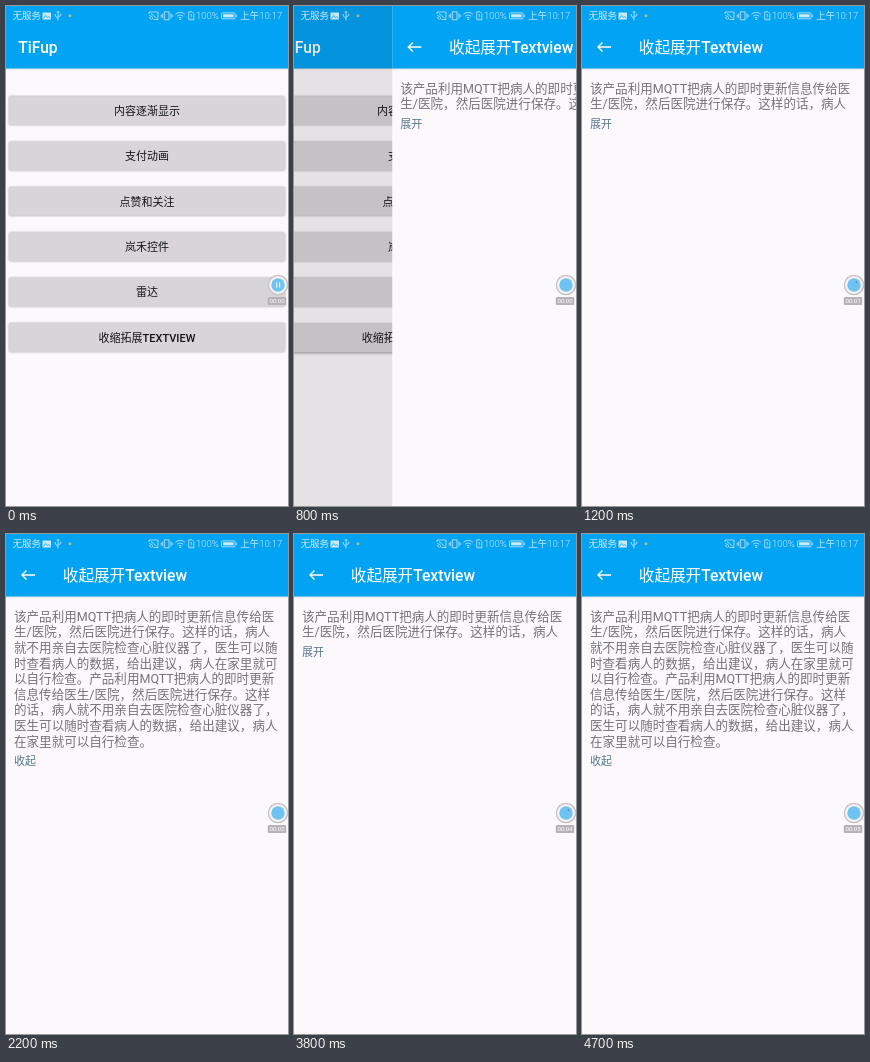
Animation of 282 by 500 pixels, one loop 4800 ms. Source, as an HTML page:

```html
<!DOCTYPE html>
<html lang="zh-CN">
<head>
<meta charset="utf-8">
<title>Expandable text demo</title>
<style>
  html, body { margin: 0; width: 100%; height: 100%; overflow: hidden; background: #fcf8fc; }
  svg { display: block; width: 100vw; height: 100vh; }
  text { font-family: Roboto, "Noto Sans CJK SC", "Noto Sans CJK", sans-serif; }
  .title { font-size: 15.6px; font-weight: 500; fill: #fff; }
  .btn text { font-size: 11px; font-weight: 500; fill: #151515; text-anchor: middle; }
  .btn rect { fill: #d8d4d8; filter: drop-shadow(0 .8px .8px rgba(0, 0, 0, .32)); }
  .btn.pressed rect { filter: drop-shadow(0 1.6px 1.5px rgba(0, 0, 0, .4)); }
  .body text { font-size: 12.55px; fill: #757378; }
  #toggle { font-size: 11px; fill: #527789; }
  .status text { font-size: 9.5px; font-weight: 300; fill: #fff; }
  .status { opacity: .78; fill: none; stroke: #fff; stroke-width: .8; }
  .status text, .status .solid { stroke: none; fill: #fff; }
  #clock { font-size: 6.1px; fill: #fff; text-anchor: middle; }
</style>
</head>
<body>
<svg viewBox="0 0 282 500">
  <defs>
    <clipPath id="fold"><rect id="foldBox" x="0" y="70" width="282" height="36"/></clipPath>
    <linearGradient id="drop" x2="0" y2="1">
      <stop offset="0" stop-color="#000" stop-opacity=".14"/>
      <stop offset="1" stop-color="#000" stop-opacity="0"/>
    </linearGradient>
  </defs>

  <g id="home">
    <rect width="330" height="500" fill="#fcf8fc"/>
    <rect width="330" height="62.5" fill="#03a3f3"/>
    <rect y="62.5" width="330" height="1.5" fill="url(#drop)"/>
    <text class="title" x="12.3" y="46.5">TiFup</text>
    <g id="list"></g>
  </g>
  <rect id="dim" width="282" height="500" opacity="0"/>

  <g id="detail">
    <rect width="282" height="500" fill="#fcf8fc"/>
    <rect width="282" height="62.5" fill="#03a3f3"/>
    <rect y="62.5" width="282" height="1.5" fill="url(#drop)"/>
    <path d="M29 41H16M20.5 36.5L16 41L20.5 45.5" fill="none" stroke="#fff" stroke-width="1.4"/>
    <text class="title" x="56.8" y="46.5">收起展开Textview</text>
    <g class="body" id="lines" clip-path="url(#fold)"></g>
    <text id="toggle" x="8" y="121.6">展开</text>
  </g>

  <g class="status">
    <text x="6.6" y="13.3">无服务</text>
    <rect class="solid" x="36.5" y="6.5" width="8.5" height="7" rx=".6"/>
    <path d="M37.5 12.5l2.3-3 1.8 2 1-1 1.8 2" stroke="#03a3f3"/>
    <path d="M52 5.5V14.5M49.3 8v2.2l2.7 1.8M54.7 7.5v2l-2.7 1.5M51 6.7l1-1.5 1 1.5"/>
    <circle cx="64" cy="9.8" r="1.5" stroke="none" fill="#c8c37a"/>
    <path d="M143 8V6h9v7.5h-4M143 9.5a4 4 0 0 1 4 4M143 11.5a2 2 0 0 1 2 2M145 7.5l5.5 4.5"/>
    <path d="M158.5 5.8h4.5v8h-4.5zM156.6 7.5v4.8M164.9 7.5v4.8M155.2 8.6v2.6M166.3 8.6v2.6"/>
    <path d="M169.5 8.3q4.7-4 9.4 0M171.2 10.2q3-2.6 6 0M172.8 12q1.4-1.2 2.8 0"/>
    <circle class="solid" cx="174.2" cy="13.2" r=".8"/>
    <path d="M182.7 5.8h3.4l1.8 1.8v6.2h-5.2zM185.3 8v2.8M185.3 11.7v.9"/>
    <text x="190" y="13.3">100%</text>
    <rect x="215.5" y="6.8" width="13.5" height="6" rx="1"/>
    <rect class="solid" x="217" y="8.2" width="10.5" height="3.2"/>
    <path d="M230.3 8.6v2.4"/>
    <text x="234.2" y="13.3">上午10:17</text>
  </g>

  <g>
    <circle cx="272" cy="279" r="9.6" fill="#f4f4f6" stroke="#c3c1c5" stroke-width="1.3"/>
    <circle cx="272" cy="279" r="6.7" fill="#6fc3f3"/>
    <path id="pause" d="M270.6 276.3v5.4M273.6 276.3v5.4" stroke="#e3eff8" stroke-width="1.2"/>
    <circle id="speck" cx="274.4" cy="276.2" r=".9" fill="#5c7f9a"/>
    <rect x="261.8" y="291" width="18.4" height="8" rx="1" fill="#b7b4b8"/>
    <text id="clock" x="271" y="297.2">00:00</text>
  </g>
</svg>
<script>
  const LOOP = 4800, STEP = 100, LINE = 15.64;
  const labels = ['内容逐渐显示', '支付动画', '点赞和关注', '岚禾控件', '雷达', '收缩拓展TEXTVIEW'];
  const story = [
    '该产品利用MQTT把病人的即时更新信息传给医',
    '生/医院，然后医院进行保存。这样的话，病人',
    '就不用亲自去医院检查心脏仪器了，医生可以随',
    '时查看病人的数据，给出建议，病人在家里就可',
    '以自行检查。产品利用MQTT把病人的即时更新',
    '信息传给医生/医院，然后医院进行保存。这样',
    '的话，病人就不用亲自去医院检查心脏仪器了，',
    '医生可以随时查看病人的数据，给出建议，病人',
    '在家里就可以自行检查。'
  ];
  const ticks = [900, 1800, 2800, 3700, 4600];
  // start, end, open amount before and after
  const folds = [[1900, 2200, 0, 1], [3200, 3400, 1, 0], [4000, 4300, 0, 1]];

  const $ = id => document.getElementById(id);
  const put = (id, attrs) => {
    for (const k in attrs) $(id).setAttribute(k, attrs[k]);
  };
  const show = (id, on) => put(id, { visibility: on ? 'visible' : 'hidden' });
  const part = (t, a, b) => Math.min(1, Math.max(0, (t - a) / (b - a)));
  const smooth = p => (1 - Math.cos(Math.PI * p)) / 2;

  $('list').innerHTML = labels.map((s, i) => {
    const y = 90.3 + 45.36 * i;
    return `<g class="btn" id="btn${i}"><rect x="3" y="${y}" width="276" height="28.8" rx="1.6"/>` +
      `<text x="141" y="${y + 18.7}">${s}</text></g>`;
  }).join('');
  $('lines').innerHTML = story.map((s, i) =>
    `<text x="8" y="${86.6 + LINE * i}">${s}</text>`).join('');

  function openAmount(t) {
    let open = 0;
    for (const [a, b, from, to] of folds)
      if (t >= a) open = from + (to - from) * smooth(part(t, a, b));
    return open;
  }

  function draw(t) {
    const slide = 1 - Math.pow(1 - part(t, 700, 1000), 2.6);
    put('home', { transform: `translate(${-38.3 * slide})` });
    put('dim', { opacity: 0.14 * slide });
    put('detail', { transform: `translate(${282 * (1 - slide)})` });
    show('detail', slide > 0);
    $('btn5').classList.toggle('pressed', t >= 500);

    const open = openAmount(t), extra = open * 7 * LINE;
    put('foldBox', { height: 36 + extra });
    put('toggle', { y: 121.6 + extra });
    $('toggle').textContent = open > 0 ? '收起' : '展开';

    show('pause', t < 100);
    show('speck', (t >= 1200 && t < 2000) || (t >= 3800 && t < 4100));
    $('clock').textContent = '00:0' + ticks.filter(x => t >= x).length;
  }

  const start = performance.now();
  function frame() {
    const t = (performance.now() - start) % LOOP;
    draw(Math.floor(t / STEP) * STEP);
    requestAnimationFrame(frame);
  }
  draw(0);
  requestAnimationFrame(frame);
</script>
</body>
</html>
```
